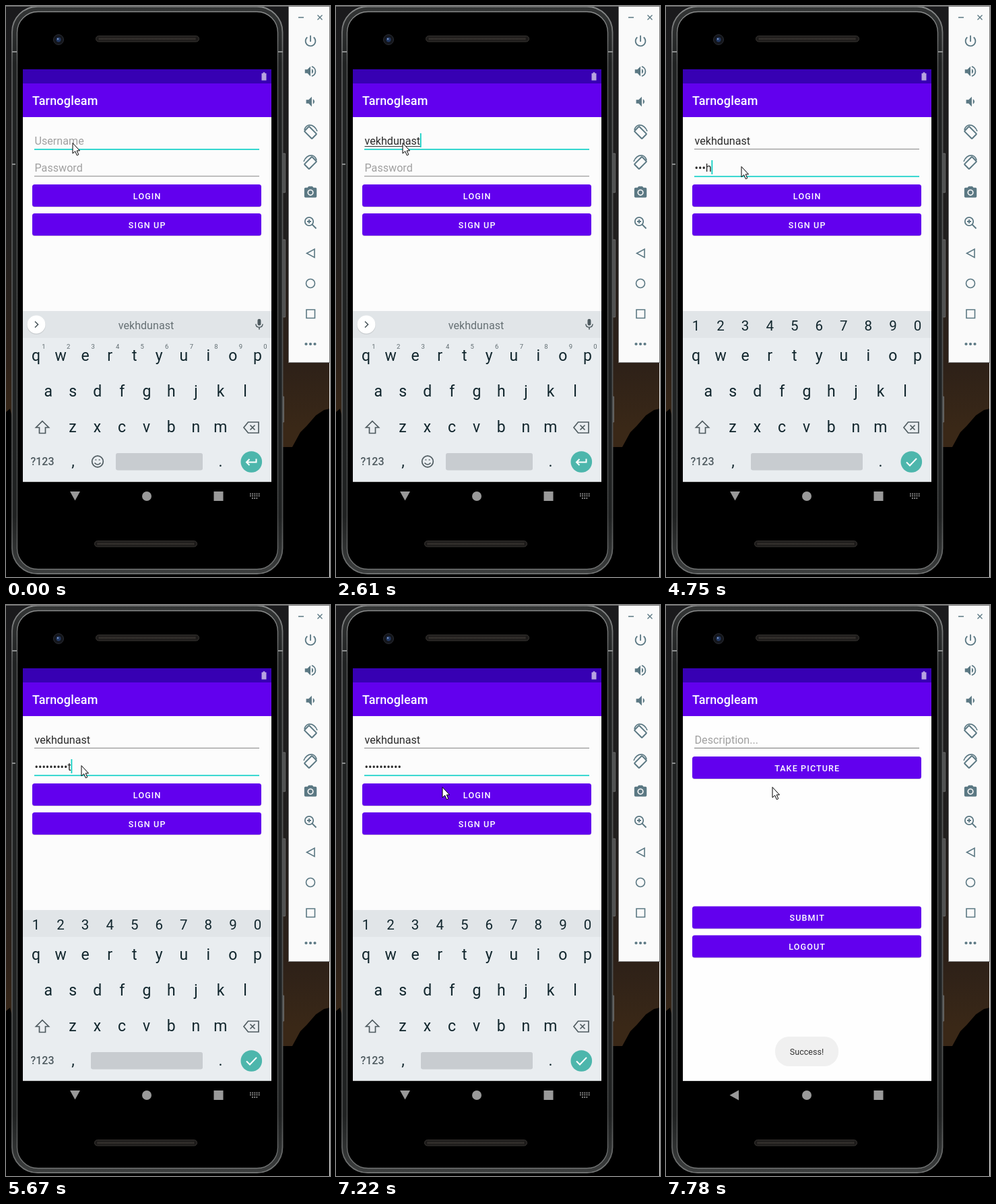
Write an HTML page that moves like this. It is 481x848 px and loops after 8 s.

```html
<!DOCTYPE html>
<html lang="en">
<head>
<meta charset="utf-8">
<title>Login demo</title>
<style>
  html, body { margin: 0; width: 100%; height: 100%; overflow: hidden; background: #000; }
  svg { display: block; width: 481px; height: 848px; font-family: Roboto, sans-serif; }
  .field { font-size: 16.15px; fill: #2a2a2a; }
  .hint { font-size: 16.15px; fill: #a0a0a0; }
  .button { font-size: 12.56px; font-weight: 500; letter-spacing: 1.12px; fill: #fff; text-anchor: middle; }
  .key { font-size: 23px; fill: #11262d; text-anchor: middle; }
  .digit { font-size: 20.5px; fill: #11262d; text-anchor: middle; }
  .corner { font-size: 9.5px; fill: #5f6b70; text-anchor: middle; }
  .word { font-size: 16.15px; fill: #667074; text-anchor: middle; }
  .bold { font-weight: 700; fill: #050505; }
  .line { fill: none; stroke: #4f5b60; stroke-width: 1.7; }
  .tool { fill: #5b7883; }
  .outline { fill: none; stroke: #5b7883; stroke-width: 2; }
</style>
</head>
<body>
<svg viewBox="0 0 481 848">
  <defs>
    <linearGradient id="sky" x2="0" y2="1">
      <stop offset="0" stop-color="#1a1a1c"/>
      <stop offset=".4" stop-color="#211f1e"/>
      <stop offset=".63" stop-color="#2e2118"/>
      <stop offset=".74" stop-color="#3a2817"/>
    </linearGradient>
    <linearGradient id="metal" x2="0" y2="1">
      <stop offset="0" stop-color="#8a8c8c"/>
      <stop offset=".1" stop-color="#5a5c5c"/>
      <stop offset=".9" stop-color="#4c4e4e"/>
      <stop offset="1" stop-color="#747676"/>
    </linearGradient>
    <linearGradient id="body" x2="0" y2="1">
      <stop offset="0" stop-color="#343636"/>
      <stop offset=".1" stop-color="#202222"/>
      <stop offset=".9" stop-color="#202222"/>
      <stop offset="1" stop-color="#3c3e3e"/>
    </linearGradient>
    <clipPath id="loginClip"><rect x="39" y="265" width="340" height="33" rx="3.5"/></clipPath>
  </defs>

  <!-- desktop -->
  <rect width="481" height="848" fill="url(#sky)"/>
  <path d="M0 848V603l6-5 5 22V655H425l12-22 10-10 13-15 12-8 9-2V848z"/>
  <path d="M480.5 529V848" stroke="#f4f4f4"/>

  <!-- phone -->
  <path d="M411 219h3.5v58H411zM411 347h3.5V462H411zM411 580h1.5v38H411z" fill="#4a4b4b" stroke="#777" stroke-width=".8"/>
  <rect x="9" y=".8" width="401.5" height="842.4" rx="38" fill="url(#body)" stroke="url(#metal)" stroke-width="1.8"/>
  <rect x="16.5" y="8.5" width="387" height="828" rx="31" fill="#000" stroke="url(#metal)" stroke-width="1.4"/>
  <path d="M9 68h7M404 68h7M9 235h5" stroke="#8b8d8d" stroke-width="2"/>
  <path d="M0 .5h420" stroke="#6a6a6a"/>
  <g fill="#1d1b1a" stroke="#393633">
    <rect x="133.5" y="44.5" width="153" height="8.5" rx="4.2"/>
    <rect x="131.5" y="794.5" width="152" height="8.5" rx="4.2"/>
  </g>
  <path d="M138 48.7h144M136 798.7h143" stroke="#45403b" stroke-width="3" stroke-dasharray="1 1"/>
  <circle cx="78" cy="50" r="7.5" fill="#14161c" stroke="#2a2c33"/>
  <circle cx="78" cy="50" r="3.4" fill="#233a66"/>
  <circle cx="77" cy="49" r="1.2" fill="#7f98c8"/>

  <!-- login screen -->
  <rect x="25" y="94" width="369" height="612.5" fill="#fcfcfc"/>
  <g id="login">
    <text class="hint" id="userHint" x="42.5" y="206">Username</text>
    <text class="field" id="user" x="42.5" y="206"></text>
    <rect id="composing" x="42.5" y="208" height="1" fill="#333"/>
    <rect id="userLine" x="42" width="334"/>
    <text class="hint" id="passHint" x="42.5" y="246">Password</text>
    <text class="field" id="pass" x="42.5" y="246"></text>
    <rect id="passLine" x="42" width="334"/>
    <rect id="caret" width="1.8" height="21" fill="#12d0c4"/>
    <g id="loginButtons"></g>
    <circle id="ripple" cx="160" cy="272" fill="#fff" clip-path="url(#loginClip)"/>
  </g>

  <!-- keyboard -->
  <rect x="25" y="453" width="369" height="253.5" fill="#e9edf0"/>
  <rect x="25" y="453" width="369" height="40" fill="#e1e5e8"/>
  <g id="keys"></g>
  <g class="line">
    <path d="M54 616.5l9.5 9.5h-5v8.5h-9v-8.5h-5z"/>
    <path d="M359.5 618H375v16H359.5L353 626zM362.5 622.5l7 7m0-7l-7 7"/>
  </g>
  <text x="54" y="682" font-size="16" font-weight="500" fill="#4f5b60" text-anchor="middle">?123</text>
  <rect id="space" y="664" height="25.5" rx="3" fill="#c8ccd0"/>
  <circle cx="364.3" cy="677" r="15.8" fill="#4db6ac"/>
  <g id="textMode">
    <g id="corners"></g>
    <circle cx="45" cy="474" r="13.8" fill="#c9cdd0"/>
    <circle cx="45" cy="473" r="13.5" fill="#fff"/>
    <path class="line" d="M43 468.5l4.5 4.5-4.5 4.5"/>
    <path fill="#4f5b60" transform="translate(366 463) scale(.83)" d="M12 14a3 3 0 003-3V5a3 3 0 00-6 0v6a3 3 0 003 3zm5.3-3a5.3 5.3 0 01-10.6 0H5a7 7 0 006 6.92V21h2v-3.08A7 7 0 0019 11z"/>
    <path id="dividers" d="M154.5 462v22M262.5 462v22" stroke="#c3c8cb"/>
    <text class="word" id="wordLeft" x="106" y="479.5"></text>
    <text class="word" id="wordMid" x="208" y="479.5"></text>
    <text class="word" id="wordRight" x="309.5" y="479.5"></text>
    <g class="line">
      <circle cx="136" cy="676.5" r="8.3"/>
      <path d="M131.5 678.5q4.5 5 9 0M132.5 674h1.8M137.7 674h1.8"/>
    </g>
    <path d="M371.5 672.5v5H357m4.5-4.5l-4.5 4.5 4.5 4.5" fill="none" stroke="#fff" stroke-width="2"/>
  </g>
  <g id="passMode">
    <g id="digits"></g>
    <path d="M357 677.5l5 5 10-10.5" fill="none" stroke="#fff" stroke-width="2"/>
  </g>

  <!-- screen after login -->
  <g id="home">
    <rect x="25" y="165" width="369" height="541.5" fill="#fefefe"/>
    <text class="hint" x="42.5" y="206">Description...</text>
    <rect x="42" y="212" width="334" height="1" fill="#777"/>
    <g id="homeButtons"></g>
    <g id="toast">
      <rect x="162" y="641" width="94" height="44" rx="21" fill="#f0f0f0"/>
      <text x="209" y="668" font-size="12.56" fill="#333" text-anchor="middle">Success!</text>
    </g>
  </g>

  <!-- system and app bars -->
  <rect x="25" y="94" width="369" height="21" fill="#3700b3"/>
  <path d="M379.5 100h2v-1.5h3V100h2v10.5h-7z" fill="#b7a3e0"/>
  <rect x="25" y="115" width="369" height="50" fill="#6200ee"/>
  <text x="39" y="147" font-size="18" font-weight="500" letter-spacing=".2" fill="#fff">Tarnogleam</text>
  <g fill="#999">
    <path id="back"/>
    <circle cx="209" cy="728" r="7"/>
    <path d="M308.5 721h14v14h-14z"/>
    <path id="keyboardIcon" d="M362 724.5h15M362 727.5h15M365 731h9" stroke="#888" stroke-width="1.8" stroke-dasharray="1.8 1.4"/>
  </g>

  <!-- emulator toolbar -->
  <rect x="419.5" y=".5" width="61" height="529" fill="#fafafa" stroke="#777"/>
  <path d="M434 17h8M462.5 13.5l7 7m0-7l-7 7" stroke="#5b7883" stroke-width="1.4"/>
  <g class="tool" id="tools"></g>
  <g class="outline">
    <g id="rotate">
      <rect x="-5" y="-8" width="10" height="16" rx="1" transform="translate(452 188) rotate(-45)"/>
      <path d="M443 184a10 10 0 0 1 6-7M449 177q9-1 13 9" stroke-width="1.7"/>
    </g>
    <use href="#rotate" transform="matrix(-1 0 0 1 904 45)"/>
    <circle cx="450" cy="320" r="6.2" stroke-width="1.8"/>
    <path d="M454.5 324.5l6 6M447 320h6m-3-3v6" stroke-width="1.8"/>
    <path d="M458 361v12.5l-11.5-6.2z" stroke-width="1.6"/>
    <circle cx="452" cy="412" r="6.5" stroke-width="1.6"/>
    <path d="M446 451h12.5v12.5H446z" stroke-width="1.6"/>
  </g>

  <path id="mouse" d="M.5.5V16l3.7-3.3 2.6 6.1 2.5-1.1-2.6-5.8h4.3z" fill="#fff" stroke="#000"/>
</svg>

<script>
const $ = id => document.getElementById(id);
const text = (cls, x, y, s) => `<text class="${cls}" x="${x}" y="${y}">${s}</text>`;

const button = (y, label) => `
  <rect x="39" y="${y + 0.7}" width="340" height="33" rx="3.5" fill="#000" opacity=".18"/>
  <rect x="39" y="${y}" width="340" height="33" rx="3.5" fill="#6200ee"/>` +
  text('button', 209.7, y + 21.8, label);
$('loginButtons').innerHTML = button(265, 'LOGIN') + button(308, 'SIGN UP');
$('homeButtons').innerHTML =
  button(225, 'TAKE PICTURE') + button(447.5, 'SUBMIT') + button(490.5, 'LOGOUT');

const row = (cls, chars, x, y) =>
  [...chars].map((c, i) => text(cls, x + i * 36.55, y, c)).join('');
$('keys').innerHTML = row('key', 'qwertyuiop', 44.5, 527) + row('key', 'asdfghjkl', 62.7, 579.5) +
  row('key', 'zxcvbnm', 99, 633) + text('key', 99.5, 684, ',') + text('key', 318.5, 684, '.');
$('corners').innerHTML = row('corner', '1234567890', 56, 509);
$('digits').innerHTML = row('digit', '1234567890', 44.5, 481.5);

const icon = (y, d) =>
  `<path transform="translate(441 ${y - 11}) scale(.92)" fill-rule="evenodd" d="${d}"/>`;
$('tools').innerHTML =
  icon(52, 'M13 3h-2v10h2zM17.83 5.17l-1.42 1.42A6.92 6.92 0 0119 12a7 7 0 11-11.42-5.42L6.17 5.17A9 9 0 1021 12c0-2.74-1.23-5.18-3.17-6.83z') +
  icon(97, 'M3 9v6h4l5 5V4L7 9zM16.5 12A4.5 4.5 0 0014 7.97v8.05A4.5 4.5 0 0016.5 12zM14 3.23v2.06a7 7 0 010 13.42v2.06a9 9 0 000-17.54z') +
  icon(142, 'M18.5 12A4.5 4.5 0 0016 7.97v8.05A4.5 4.5 0 0018.5 12zM5 9v6h4l5 5V4L9 9z') +
  icon(277, 'M9 2L7.17 4H4a2 2 0 00-2 2v12a2 2 0 002 2h16a2 2 0 002-2V6a2 2 0 00-2-2h-3.17L15 2zM12 17a5 5 0 110-10 5 5 0 010 10zM12 15.2a3.2 3.2 0 110-6.4 3.2 3.2 0 010 6.4z') +
  [445.5, 452, 458.5].map(x => `<circle cx="${x}" cy="502" r="2.1"/>`).join('');

const LOOP = 8000;
const NAME = 'vekhdunast';
const userTimes = [960, 1080, 1200, 1340, 1740, 2130, 2250, 2370, 2490, 2610];
const passTimes = [4450, 4600, 4600, 4750, 5000, 5280, 5400, 5520, 5670, 5670];
const caretOn = [[150, 710], [960, 3170], [3610, 4170], [4450, 6200], [6740, 7220]];
const mousePath = [[0, 99, 203], [3170, 189, 209], [3320, 122, 238], [3460, 112, 238], [6490, 158, 270]];
const guesses = [['very', 'via'], ['very', 'vet'], ['Vek', 'week'], ['Vekh', 'cash']];

const count = (times, t) => times.filter(x => x <= t).length;
const show = (id, on) => { $(id).style.display = on ? '' : 'none'; };
const set = (id, attrs) => { for (const k in attrs) $(id).setAttribute(k, attrs[k]); };
const underline = (id, y, focused) => set(id, focused
  ? { y, height: 1.8, fill: '#1fd3cb' }
  : { y, height: 1, fill: '#858585' });

function drawSuggestions(t, typed) {
  const three = typed > 0 && t < 1860;
  const [mid, right] = three ? guesses[Math.min(typed, 4) - 1] : [NAME.slice(0, typed || 10), ''];
  $('wordLeft').textContent = three ? NAME.slice(0, typed) : '';
  $('wordMid').textContent = mid;
  $('wordRight').textContent = right;
  $('wordMid').setAttribute('class', three ? 'word bold' : 'word');
  show('dividers', three);
}

function draw(t) {
  const typed = count(userTimes, t), secret = count(passTimes, t);
  const onPass = t >= 3610, passKeys = t >= 3750, home = t >= 7510;

  $('user').textContent = NAME.slice(0, typed);
  $('pass').textContent = secret
    ? '•'.repeat(secret - 1) + (t < 7220 ? NAME[secret - 1] : '•') : '';
  show('userHint', !typed);
  show('passHint', !secret);
  underline('userLine', 212, !onPass);
  underline('passLine', 252.3, onPass);
  set('composing', { width: onPass ? 0 : $('user').getComputedTextLength() });

  const active = $(onPass ? 'pass' : 'user');
  set('caret', { x: 42.2 + active.getComputedTextLength(), y: onPass ? 229 : 189 });
  show('caret', caretOn.some(([from, to]) => t >= from && t < to));

  drawSuggestions(t, typed);
  show('textMode', !passKeys);
  show('passMode', passKeys);
  set('space', passKeys ? { x: 126, width: 166 } : { x: 163, width: 129 });

  const press = t - 6740;
  show('ripple', press >= 0 && press < 480);
  set('ripple', { r: Math.max(0, 107 + press), opacity: 0.12 * Math.max(0, Math.min(1, (480 - press) / 300)) });

  show('home', home);
  set('home', { opacity: t < 7660 ? 0.8 : 1 });
  set('toast', { opacity: t < 7660 ? 0 : t < 7780 ? 0.6 : 1 });
  set('back', { d: home ? 'M94.5 728l13.5-7.5v15z' : 'M95 721h15l-7.5 13.5z' });
  show('keyboardIcon', !home);

  const [, x, y] = mousePath[count(mousePath.map(p => p[0]), t) - 1];
  set('mouse', { transform: `translate(${x - 0.5} ${y})` });
}

const start = performance.now();
function tick() {
  draw((performance.now() - start) % LOOP);
  requestAnimationFrame(tick);
}
tick();
</script>
</body>
</html>
```
